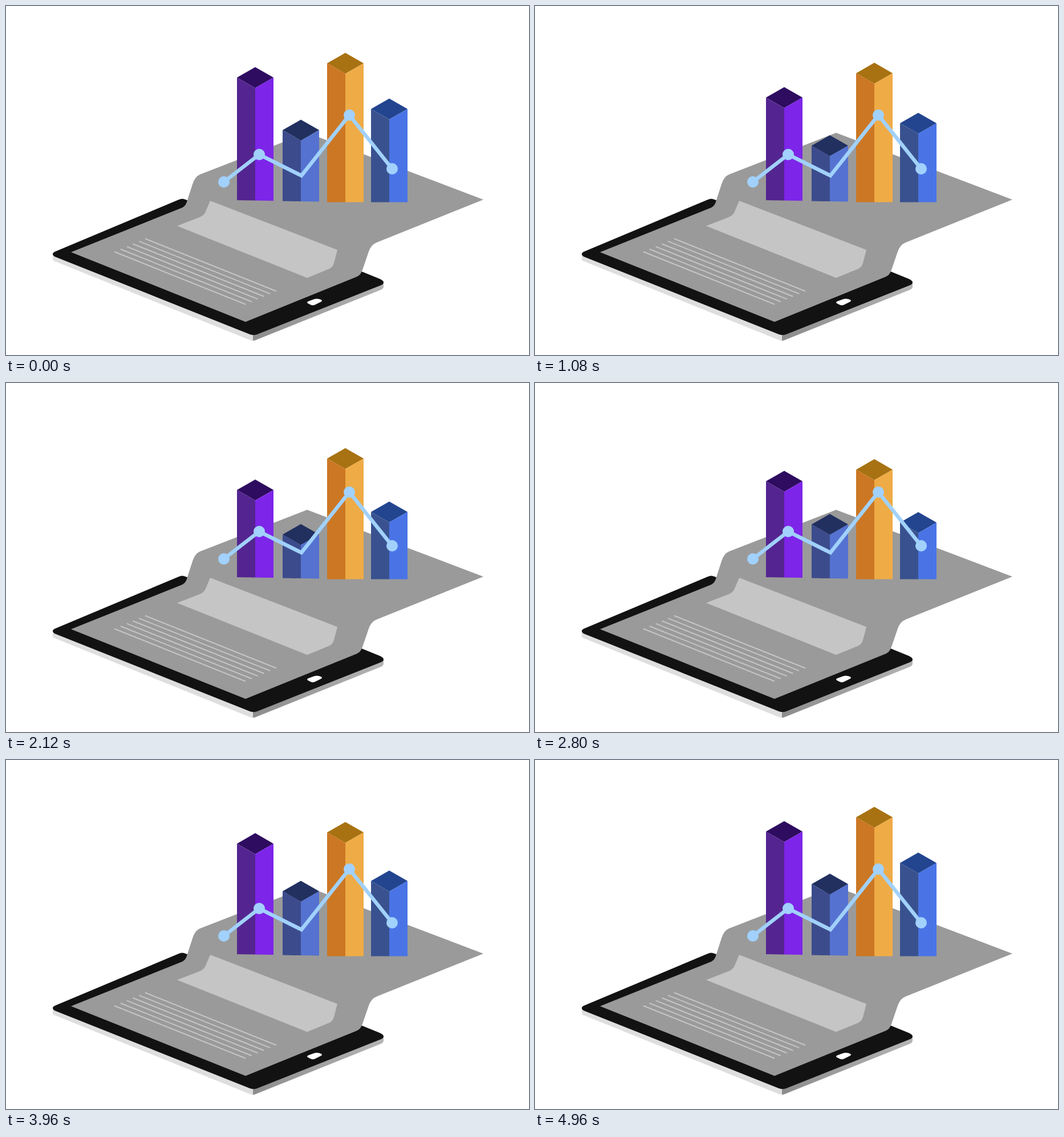
An HTML page that plays this animation: 917 px wide and 611 px high, repeating every 5.04 s.

```html
<!DOCTYPE html>
<html lang="en">
<head>
<meta charset="utf-8">
<title>Tablet bar chart</title>
<style>
  html, body { margin: 0; width: 100%; height: 100%; overflow: hidden; background: #fff; }
  svg { display: block; width: 100%; height: 100%; }
</style>
</head>
<body>
<svg viewBox="0 0 917 611">
  <defs>
    <linearGradient id="edge"><stop stop-color="#8c8c8c"/><stop offset="1" stop-color="#b4b4b4"/></linearGradient>
  </defs>

  <!-- Tablet -->
  <path fill="#dedede" d="M82 434V443Q82 446 86 447L428 585Q431 586 434 586V572Z"/>
  <path fill="url(#edge)" d="M433 572V586Q436 586 440 584L657 497Q662 495 662 491V482Z"/>
  <path fill="#121212" d="M86 430L303 339Q309 336 315 339L656 478Q662 481 662 484Q662 487 657 489L440 575Q434 577 428 575L86 439Q82 437 82 434Q82 432 86 430Z"/>
  <path fill="#fff" d="M530 517L541 513Q545 512 549 513L552 514Q556 516 552 518L542 523Q538 525 534 523L530 521Q526 519 530 517Z"/>

  <!-- Sheet rising from the screen -->
  <path fill="#9a9a9a" d="M114 431L309 353Q315 350 317 343L327 312Q331 299 340 295L528 222L837 339L650 414Q640 418 636 430L625 462Q622 471 615 474L420 553Z"/>
  <path fill="#c5c5c5" d="M358 341L581 427L575 450Q573 457 567 460L528 476L300 385L339 370Q347 367 350 360Z"/>
  <g id="lines" stroke="#c5c5c5" stroke-width="2"></g>

  <g id="bars"></g>

  <g fill="#a1d1fc">
    <path fill="none" stroke="#a1d1fc" stroke-width="6.5" d="M382 308L444 260L518 297L602 191L677 285"/>
    <circle cx="382" cy="308" r="10"/>
    <circle cx="444" cy="260" r="10"/>
    <circle cx="602" cy="191" r="10"/>
    <circle cx="677" cy="285" r="10"/>
  </g>
</svg>
<script>
const LOOP = 5040, STEP = 40, END = 4960;
const HALF = 32, RISE = 18.3;

// keys: [time, top y, speed]; floor: base y at the left, middle and right edge
const bars = [
  { x: 437, floor: [340, 340.5, 341], colors: ['#2e0c60', '#542590', '#7d25e8'],
    keys: [[0, 107, 0], [2000, 169.5, 0], [3440, 139, -.01], [END, 107, 0]] },
  { x: 517, floor: [341.5, 342, 342.5], colors: ['#21305f', '#3c4b8c', '#5572d0'],
    keys: [[0, 199, 0], [2000, 247.5, 0], [3440, 216, 0], [END, 199, 0]] },
  { x: 595, floor: [343.5, 343.5, 343.5], colors: ['#a87212', '#cc7724', '#efab46'],
    keys: [[0, 82, 0], [2000, 113, 0], [2960, 135, 0], [END, 82, 0]] },
  { x: 672, floor: [343.5, 343.5, 343.5], colors: ['#23458f', '#39528f', '#4a74e6'],
    keys: [[0, 162, 0], [2000, 206.5, 0], [2920, 227, 0], [END, 162, 0]] }
];

function add(parent, name, attrs) {
  const el = document.createElementNS('http://www.w3.org/2000/svg', name);
  for (const key in attrs) el.setAttribute(key, attrs[key]);
  return document.getElementById(parent).appendChild(el);
}

for (let i = 0; i < 6; i++) {
  const x = 244 - 10.8 * i, y = 407.3 + 4.6 * i;
  add('lines', 'path', { d: `M${x} ${y}l230 92` });
}
for (const bar of bars) bar.faces = bar.colors.map(fill => add('bars', 'path', { fill }));

// Cubic Hermite interpolation between neighbouring keys
function valueAt(keys, t) {
  const i = Math.max(1, keys.findIndex(key => key[0] >= t));
  const [t0, y0, v0] = keys[i - 1], [t1, y1, v1] = keys[i];
  const d = t1 - t0, s = (t - t0) / d, r = 1 - s;
  return y0 + (y1 - y0) * s * s * (3 - 2 * s) + d * s * r * (v0 * r - v1 * s);
}

function draw(t) {
  for (const { x, floor, keys, faces } of bars) {
    const y = valueAt(keys, t), mid = y + RISE, low = mid + RISE;
    const l = x - HALF, r = x + HALF;
    faces[0].setAttribute('d', `M${x} ${y}L${r} ${mid}L${x} ${low}L${l} ${mid}Z`);
    faces[1].setAttribute('d', `M${l} ${mid}L${x} ${low}V${floor[1]}L${l} ${floor[0]}Z`);
    faces[2].setAttribute('d', `M${r} ${mid}L${x} ${low}V${floor[1]}L${r} ${floor[2]}Z`);
  }
}

const start = performance.now();
function tick() {
  const t = (performance.now() - start) % LOOP;
  draw(Math.min(END, Math.floor(t / STEP) * STEP));
  requestAnimationFrame(tick);
}
tick();
</script>
</body>
</html>
```
